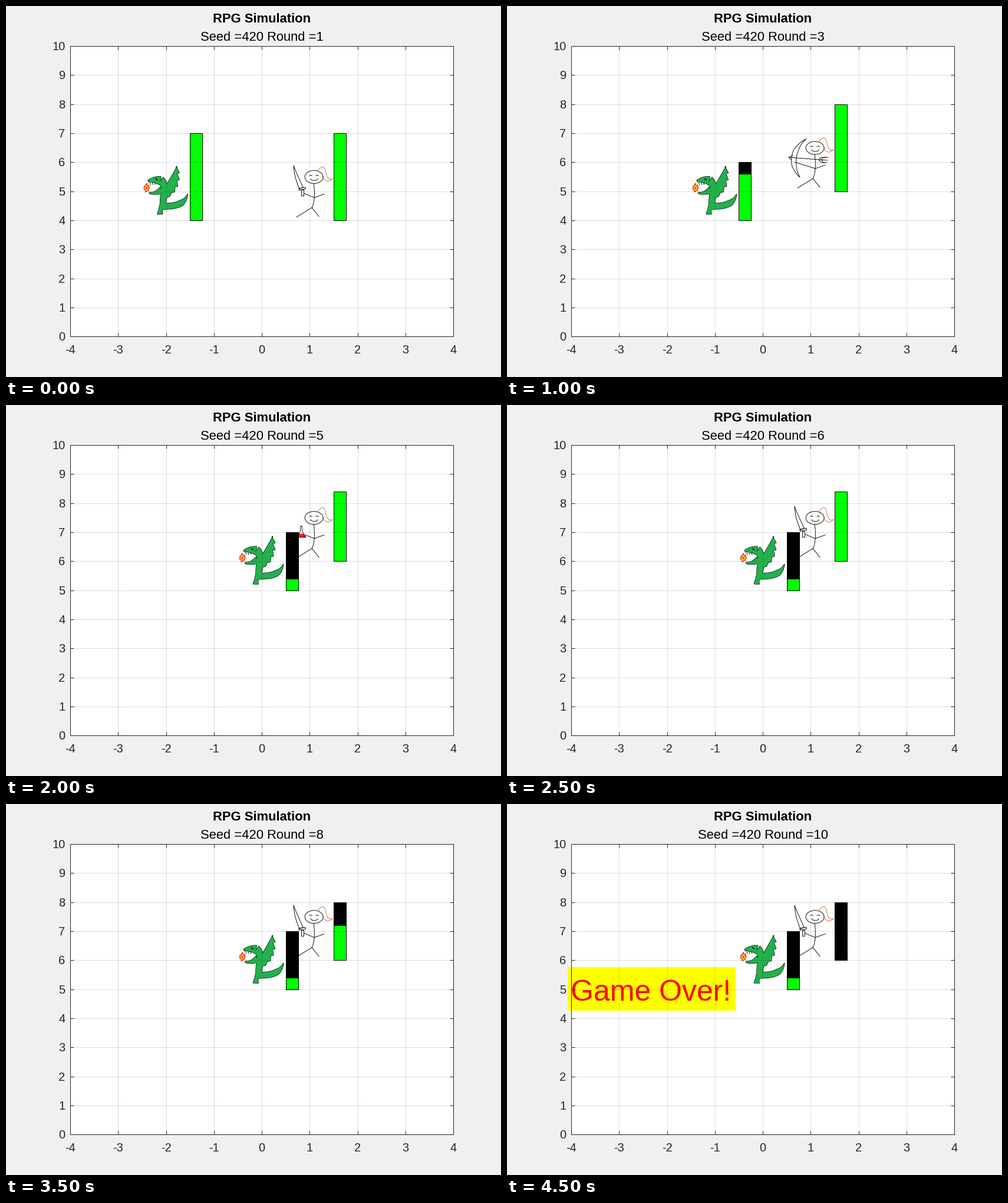
These frames come from a looping animation (840 px wide and 630 px high, 5 s). A matplotlib script:

```python
import numpy as np
import matplotlib.pyplot as plt
from matplotlib.animation import FuncAnimation
from matplotlib.patches import Polygon, Rectangle

W, H, DPI = 840, 630, 100
PX = 72 / DPI
COL, ROW, BAR = 81.25, 49.34, 21
DARK, GREEN, LIME, HAIR = "#262626", "#22b14c", "#00ff00", "#c0714a"
ROUNDS = 10
HERO_HITS = {3: 1.4, 4: -0.8, 6: 1.0, 7: 0.2, 8: 0.6, 9: 0.6}
DRAGON_HITS = {2: 1.4, 3: 1.2}

plt.rcParams["font.family"] = "Liberation Sans"
fig = plt.figure(figsize=(W / DPI, H / DPI), dpi=DPI, facecolor="#f0f0f0")
ax = fig.add_axes([0, 0, 1, 1])
ax.set(xlim=(0, W), ylim=(H, 0))
ax.axis("off")
artists = []


def sx(x):
    return 109 + COL * (x + 4)


def sy(y):
    return 561.4 - ROW * y


def corner(x, y):
    return np.array([sx(x - 0.5) + 0.5, sy(y + 2)])


def curve(*points, n=24):
    """Polynomial curve through a few evenly timed points."""
    k = len(points)
    coeffs = np.polyfit(np.linspace(0, 1, k), np.array(points, float), k - 1)
    t = np.linspace(0, 1, n)
    return np.column_stack([np.polyval(c, t) for c in coeffs.T])


def limb(widths, *points):
    """Closed outline around a curve whose width varies along its length."""
    c = curve(*points)
    d = np.gradient(c, axis=0)
    normal = np.column_stack([-d[:, 1], d[:, 0]]) / np.hypot(*d.T)[:, None]
    w = np.interp(np.linspace(0, 1, len(c)), np.linspace(0, 1, len(widths)), widths)
    side = normal * w[:, None] / 2
    return np.vstack([c + side, (c - side)[::-1], c[:1] + side[:1]])


def arc(x, y, rx, ry, start=0, end=360):
    a = np.radians(np.linspace(start, end, 40))
    return np.column_stack([x + rx * np.cos(a), y + ry * np.sin(a)])


def stroke(o, points, color="black", lw=0.9, z=1):
    p = np.array(points, float) + o
    artists.extend(ax.plot(*p.T, color=color, lw=lw * PX, zorder=z))


def fill(o, points, color, z=1, edge="none", lw=0):
    artists.append(ax.add_patch(Polygon(np.array(points, float) + o, fc=color,
                                        ec=edge, lw=lw * PX, zorder=z)))


def box(x, y, w, h, z, **style):
    artists.append(ax.add_patch(Rectangle((x, y), w, h, zorder=z, **style)))


def draw_bar(x, y, health):
    for height, color in ((2, "black"), (health, LIME)):
        if height > 0.01:
            box(sx(x + 0.5), sy(y + height), BAR, ROW * height, 3,
                fc=color, ec="black", lw=PX, snap=True)


def wing():
    front = curve((39, 42), (50, 23), (59, 7))
    back = curve((59, 7), (61, 27), (56, 45), (43, 59), n=61)
    back[:, 0] += 5 * (np.linspace(0, 5, 61) % 1) - 2.5
    return np.vstack([front, back[1:]])


def draw_flame(o):
    rng = np.random.default_rng(4)
    a = np.linspace(0, 2 * np.pi, 18, endpoint=False)
    r = rng.uniform(0.55, 1.15, a.size)
    ring = np.column_stack([5 * r * np.cos(a), 8 * r * np.sin(a)])
    for scale, color in ((1, "#ed3a2e"), (0.65, "#ffd21e"), (0.3, "#ed3a2e")):
        fill(o + (7, 44), ring * scale, color, 2)


def draw_dragon(x, y):
    o = corner(x, y)
    parts = [
        wing(),
        limb((14, 10, 11, 9), (31, 31), (37, 43), (36, 60), (35, 76)),
        limb((10, 10, 10, 0), (34, 75), (50, 74), (66, 69), (77, 54)),
        limb((9, 6, 9), (34, 74), (31, 81), (30, 88)),
        limb((3, 9, 14), (10, 32), (20, 30), (30, 31)),
        limb((2, 5, 11), (12, 52), (22, 52), (33, 47)),
    ]
    for part in parts:
        fill(o, part, GREEN, 2, "black", 1.3)
    for part in parts:
        fill(o, part, GREEN, 2.1)
    stroke(o, [(23, 28), (25, 30)], lw=1.5, z=2.2)
    for k in range(3):
        stroke(o, [(13 + 4 * k, 35), (14 + 4 * k, 38)], z=2.2)
    draw_flame(o)


def draw_sword(o):
    stroke(o, limb((0, 5, 7), (13, 6), (18, 24), (26, 44)))
    stroke(o, limb((3, 3), (22, 46), (33, 44)))
    stroke(o, limb((4, 4), (28, 47), (28, 57)))
    stroke(o, [(31, 53), (48, 60)])


def draw_bow(o):
    stroke(o, limb((0, 8, 8, 0), (32, 10), (15, 30), (12, 53), (22, 75)))
    stroke(o, [(4, 41), (69, 46)])
    stroke(o, [(10, 38), (3, 41), (7, 45)])
    for x in (54, 58):
        stroke(o, [(x + 12, 41), (x + 4, 41), (x, 45), (x + 4, 50), (x + 10, 50)])
    stroke(o, [(13, 49), (48, 60)])


def draw_potion(o):
    fill(o, limb((9, 15), (26, 52), (26, 58)), "#ed1c24")
    stroke(o, limb((2, 4, 16), (26, 39), (26, 49), (26, 58)))
    stroke(o, [(33, 54), (48, 60)])


def draw_hero(x, y, draw_item):
    o = corner(x, y)
    stroke(o, arc(47.5, 25, 15.5, 11))
    for eye in (42, 53):
        stroke(o, arc(eye, 23, 2, 1, 180, 360))
    stroke(o, arc(48, 28, 6, 3, 0, 180))
    stroke(o, curve((53, 15), (65, 9), (69, 22), (79, 28)), HAIR)
    stroke(o, curve((63, 26), (70, 32), (79, 28)), HAIR)
    stroke(o, curve((47, 36), (48, 60), (44, 77)))
    stroke(o, [(48, 60), (65, 54)])
    stroke(o, [(18, 93), (44, 77), (56, 92)])
    draw_item(o)


def label(x, y, text, size, **style):
    style.setdefault("ha", "center")
    return ax.text(x, y, text, fontsize=size * PX, va="baseline", **style)


def draw_axes():
    left, right, top, bottom = sx(-4), sx(4), sy(10), sy(0)
    ax.add_patch(Rectangle((left, top), right - left, bottom - top, fc="white",
                           ec="none", zorder=0))

    def line(xs, ys, **style):
        ax.plot(xs, ys, color=DARK, lw=PX, zorder=4, snap=True,
                solid_capstyle="butt", **style)

    for x in range(-4, 5):
        p = sx(x)
        line([p, p], [top, bottom], alpha=0.15)
        for edge, inward in ((top, 6), (bottom, -6)):
            line([p, p], [edge, edge + inward])
        label(p, 590, str(x), 20, color=DARK)
    for y in range(11):
        p = sy(y)
        line([left, right], [p, p], alpha=0.15)
        for edge, inward in ((left, 6), (right, -6)):
            line([edge, edge + inward], [p, p])
        label(100.5, p + 7, str(y), 20, color=DARK, ha="right")
    line([left, right, right, left, left], [top, top, bottom, bottom, top])
    label(434.5, 28, "RPG Simulation", 22, weight="bold")


def draw_ending():
    box(103, 277, 285, 74, 3.5, fc="yellow", ec="none")
    artists.append(label(108.5, 334, "Game Over!", 50, color="red", ha="left",
                         zorder=3.6))


def health(hits, i):
    return 3 - sum(loss for when, loss in hits.items() if when <= i)


def update(i):
    while artists:
        artists.pop().remove()
    # The dragon walks right, then up; the hero lunges once and backs away.
    dragon = min(max(i - 3, -2), 0), 4 + (i >= 4)
    hero = int(i != 1), 4 + (i >= 2) + (i >= 4)
    item = draw_bow if i in (1, 2) else draw_potion if i == 4 else draw_sword
    draw_hero(*hero, item)
    draw_dragon(*dragon)
    draw_bar(*hero, health(HERO_HITS, i))
    draw_bar(*dragon, health(DRAGON_HITS, i))
    artists.append(label(434.5, 59, f"Seed =420 Round ={i + 1}", 22))
    if i == ROUNDS - 1:
        draw_ending()
    return artists


draw_axes()
anim = FuncAnimation(fig, update, frames=ROUNDS, init_func=lambda: update(0),
                     interval=500, repeat=True, blit=False)
plt.show()
```
